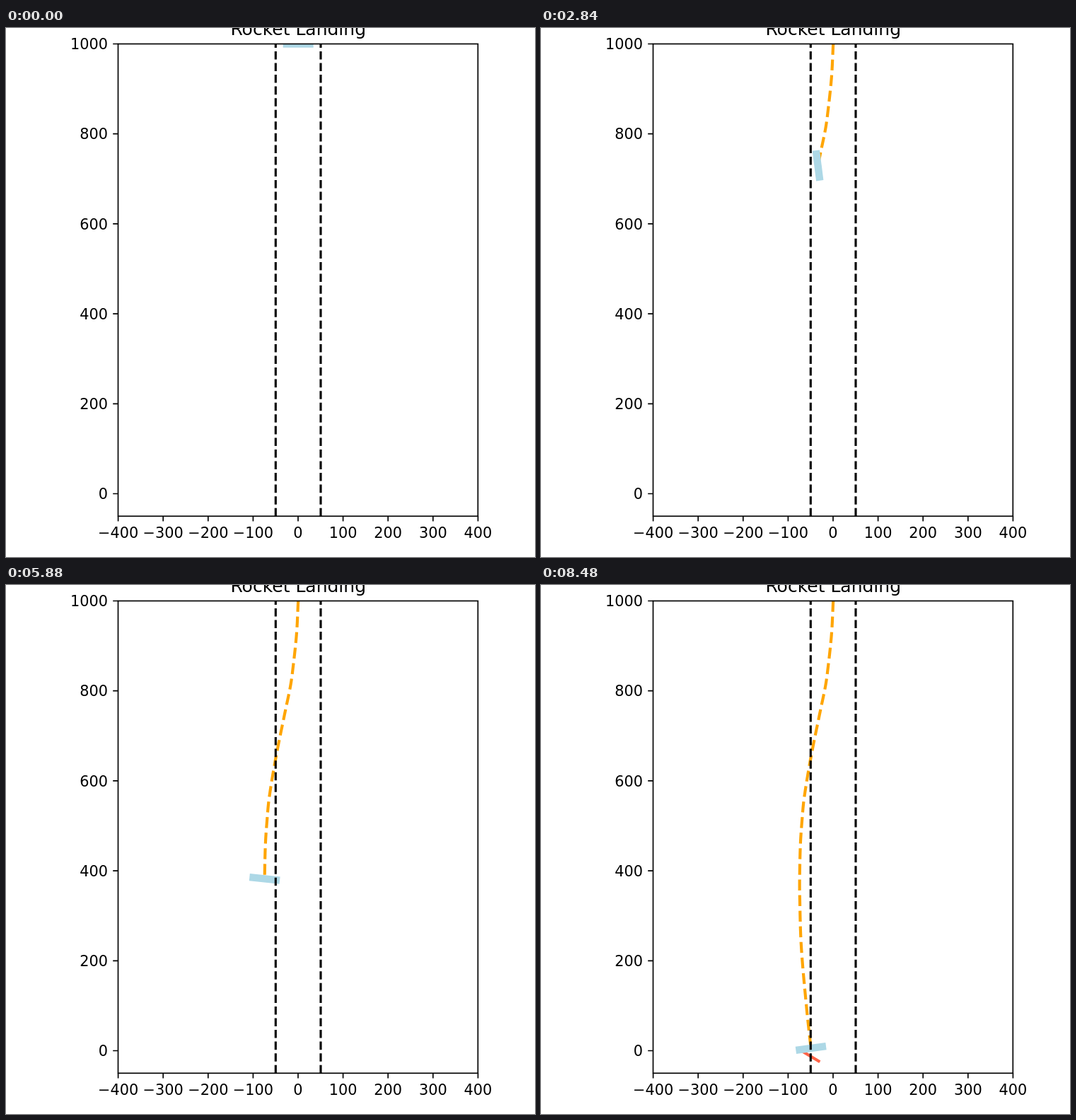
Recreate the animation shown at these times as an HTML page. Size 748 by 748 pixels, loop 8.52 s.

```html
<!DOCTYPE html>
<html lang="en">
<head>
<meta charset="utf-8">
<title>Rocket Landing</title>
<style>
  html, body { margin: 0; width: 100%; height: 100%; overflow: hidden; background: #fff; }
  svg { display: block; width: 748px; height: 748px; }
  text { font: 20.83px "DejaVu Sans", sans-serif; fill: #000; }
  .title { font-size: 25px; }
  .axis { fill: none; stroke: #000; stroke-width: 1.67; }
  .limit { stroke: #000; stroke-width: 3.125; stroke-dasharray: 11.56 5; }
  #trail { fill: none; stroke: #ffa500; stroke-width: 4.17; stroke-dasharray: 15.42 6.67; stroke-linejoin: round; }
  #flame { stroke: #ff6347; stroke-width: 4.17; stroke-linecap: square; }
  #rocket { fill: #add8e6; }
</style>
</head>
<body>
<svg viewBox="0 0 748 748">
  <clipPath id="plot"><rect x="158.5" y="22.5" width="508.8" height="668"/></clipPath>
  <g clip-path="url(#plot)">
    <polyline id="trail"/>
    <line id="flame"/>
    <rect id="rocket" x="-21.5" y="-5.2" width="43" height="10.4"/>
    <path class="limit" d="M381.3 690.3V22.5M445 690.3V22.5"/>
  </g>
  <rect class="axis" x="158.5" y="22.5" width="508.8" height="667.8"/>
  <path class="axis" id="ticks"/>
  <g id="labels"><text class="title" x="413.2" y="10" text-anchor="middle">Rocket Landing</text></g>
</svg>
<script>
const LOOP = 8520, STEP = 40;
const $ = id => document.getElementById(id);

// time, x, y, rotation in degrees
const flight = [
  [0, 413.2, 22.5, 0], [880, 410.7, 71, 5], [1760, 405, 123.7, 30],
  [2080, 402, 144, 44], [2640, 394.3, 181, 72], [3600, 381.2, 246, 124],
  [4400, 372, 302, 157], [4840, 369, 334, 171], [5280, 366.8, 367, 180],
  [5880, 365.7, 415.3, 186], [6160, 365.8, 438.5, 186.5], [6960, 368, 510.7, 176],
  [7920, 375.8, 600.8, 173], [8480, 381.7, 655, 172.5]
];
// time, thrust vector
const thrust = [
  [0, 0, 0], [6500, 0, 0], [6960, 11, -7.5], [7200, 13, -9],
  [7500, 17, 0], [7920, 22, 8], [8480, 27, 16]
];

function slope(keys, i, k) {
  const a = keys[Math.max(i - 1, 0)], b = keys[Math.min(i + 1, keys.length - 1)];
  return (b[k] - a[k]) / (b[0] - a[0]);
}

// Cubic Hermite interpolation through the keys
function curve(keys, t) {
  let i = 0;
  while (i < keys.length - 2 && t > keys[i + 1][0]) i++;
  const a = keys[i], b = keys[i + 1], span = b[0] - a[0];
  const u = (t - a[0]) / span, v = 1 - u;
  return a.slice(1).map((p, n) => {
    const k = n + 1;
    return v * v * (1 + 2 * u) * p + u * u * (1 + 2 * v) * b[k]
      + span * u * v * (v * slope(keys, i, k) - u * slope(keys, i + 1, k));
  });
}

function linear(keys, t) {
  let i = 0;
  while (i < keys.length - 2 && t > keys[i + 1][0]) i++;
  const a = keys[i], b = keys[i + 1], u = (t - a[0]) / (b[0] - a[0]);
  return a.slice(1).map((p, n) => p + u * (b[n + 1] - p));
}

function label(value, x, y, anchor) {
  const el = document.createElementNS("http://www.w3.org/2000/svg", "text");
  el.setAttribute("x", x);
  el.setAttribute("y", y);
  el.setAttribute("text-anchor", anchor);
  el.textContent = String(value).replace("-", "\u2212");
  $("labels").append(el);
}

let ticks = "";
for (let n = -400; n <= 400; n += 100) {
  const x = 413 + n * 0.636;
  ticks += `M${x} 690.3v7.3`;
  label(n, x, 721, "middle");
}
for (let n = 0; n <= 1000; n += 200) {
  const y = 658.5 - n * 0.636;
  ticks += `M158.5 ${y}h-7.3`;
  label(n, 144, y + 7.6, "end");
}
$("ticks").setAttribute("d", ticks);

const poses = [];
for (let t = 0; t < LOOP; t += STEP) poses.push(curve(flight, t));
const points = poses.map(([x, y]) => `${x.toFixed(2)},${y.toFixed(2)}`);

function draw(now) {
  const n = Math.floor((now % LOOP) / STEP);
  const [x, y, turn] = poses[n];
  $("trail").setAttribute("points", points.slice(0, n + 1).join(" "));
  $("rocket").setAttribute("transform", `translate(${x} ${y}) rotate(${turn})`);

  const [dx, dy] = linear(thrust, n * STEP), rad = turn * Math.PI / 180;
  const fx = x + 16.3 * Math.cos(rad), fy = y + 16.3 * Math.sin(rad);
  const ends = { x1: fx, y1: fy, x2: fx + dx, y2: fy + dy };
  for (const key in ends) $("flame").setAttribute(key, ends[key]);
  $("flame").setAttribute("visibility", dx ? "visible" : "hidden");
}

const start = performance.now();
function tick() {
  draw(performance.now() - start);
  requestAnimationFrame(tick);
}
tick();
</script>
</body>
</html>
```
